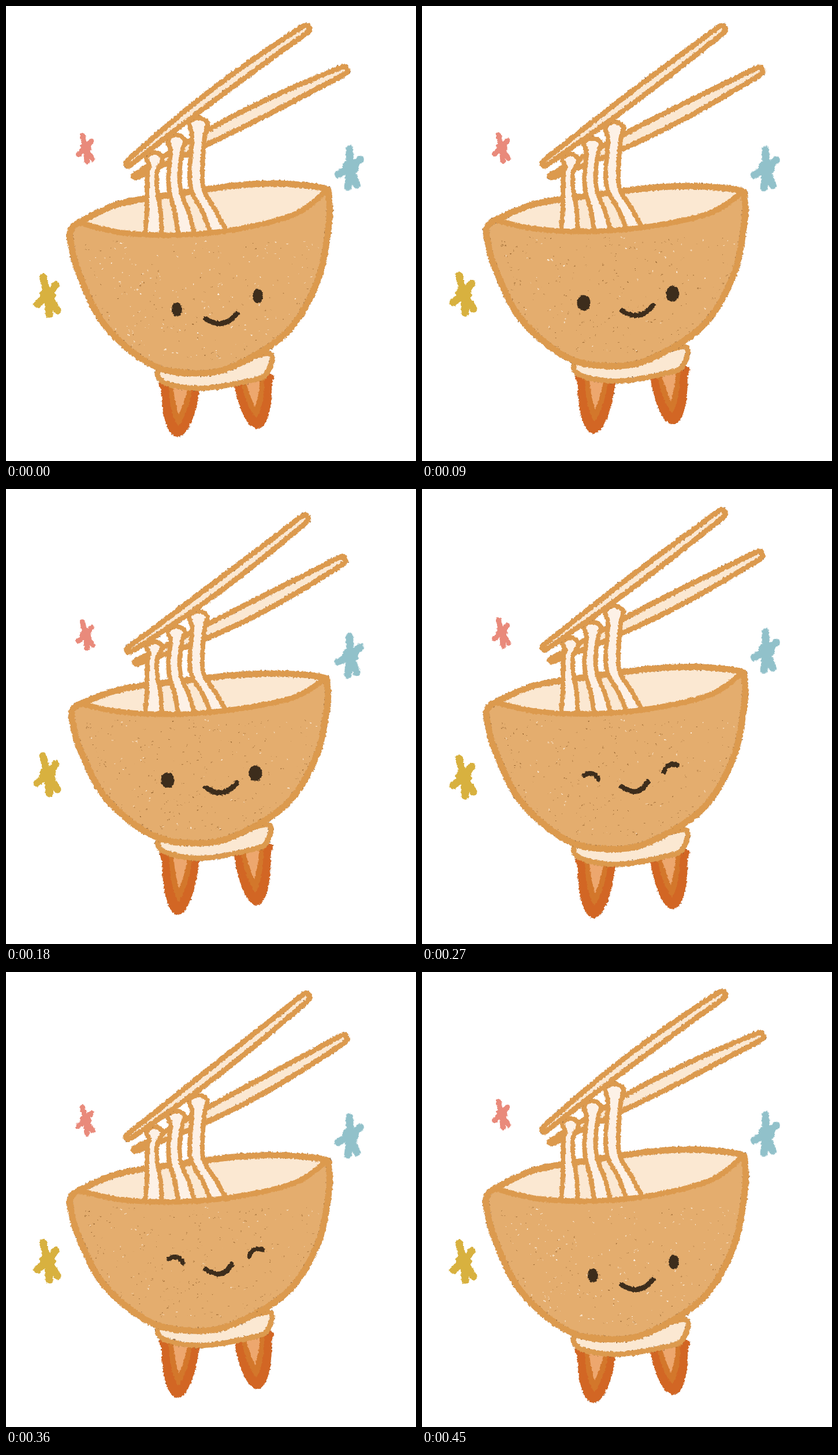
Recreate the animation shown at these times as an HTML page. Size 710x789 px, loop 0.54 s.

```html
<!DOCTYPE html>
<html lang="en">
<head>
<meta charset="utf-8">
<title>Happy noodle bowl</title>
<style>
html, body { margin: 0; width: 100%; height: 100%; overflow: hidden; background: #fff; }
#stage { position: relative; width: 710px; height: 789px; overflow: hidden; }
#strip { display: flex; width: 4260px; height: 789px; animation: play 540ms steps(6) infinite; }
#strip svg { flex: none; width: 710px; height: 789px; display: block; }
#defs { position: absolute; width: 0; height: 0; }
path { stroke-linecap: round; stroke-linejoin: round; }
.flat { stroke-linecap: butt; }
@keyframes play { to { transform: translateX(-4260px); } }
</style>
</head>
<body>
<svg id="defs">
  <filter id="rough" filterUnits="userSpaceOnUse" x="0" y="0" width="710" height="789" color-interpolation-filters="sRGB">
    <feTurbulence type="fractalNoise" baseFrequency=".25" numOctaves="2" seed="4"/>
    <feDisplacementMap in="SourceGraphic" scale="4.5" xChannelSelector="R" yChannelSelector="G"/>
  </filter>
</svg>
<div id="stage"><div id="strip"></div></div>
<script>
const LINE = '#dc9a4e', TAN = '#e4ad6e', CREAM = '#fbe8d2', NOODLE = '#fdf1e6', INK = '#3d2d1c', GRIT = '#7a5230';
const CARROT = ['#d26624', '#d3772b', '#eda76e'];

const pts = s => s.split(' ').map(p => p.split(',').map(Number));
const lerp = (a, b, t) => a + (b - a) * t;
const clamp = t => Math.min(1, Math.max(0, t));
const range = n => Array.from({ length: n }, (_, i) => i);

// key points of the bowl
const BACK = pts('140,368 200,342 300,325 400,311 475,308 550,316');
const SIDE = pts('559,332 559,380 540,475 488,564 400,622 330,637 250,621 170,552 126,463 113,415 113,387');
const FRONT = pts('128,376 200,393 300,397 400,387 500,361 555,320');
const FOOT = pts('267,630 274,653 340,663 430,648 453,635 457,603 400,615 330,625');

const LEGS = [{ base: [303, 650], tip: [297, 747] }, { base: [426, 638], tip: [435, 733] }];
const UPPER = { from: [213, 272], to: [519, 40], ends: [4.5, 6.5], belly: 3.5, arch: -7 };
const LOWER = { from: [226, 294], to: [584, 112], ends: [3, 6.5], belly: 7.5, arch: -4 };

const RAYS = pts('-8,-32 14,-18 -18,15 3,33 17,26');
const STARS = [
  { color: '#e98a7b', x: 138, y: 247, size: .7, turn: 0 },
  { color: '#91c1ca', x: 596, y: 281, size: 1, turn: 12 },
  { color: '#d8b13f', x: 72, y: 502, size: 1, turn: 0 }
];

// body: shift of back rim, front rim, foot and toes; stick: shift at left, right and sag
const KNOTS = [304, 390, 655, 747];
const POSES = [
  { body: [0, 0, 0, 0], sx: 1, stick: [0, 0, 0], stars: [0, 0, 0], left: [296, 526], right: [436, 503], eye: 9, smile: 542 },
  { body: [5, -6, -13, -6], sx: .997, stick: [0, 1, 8], stars: [-1, 1, -3], left: [280, 515], right: [434, 499], eye: 11.5, smile: 528 },
  { body: [13, -6, -24, -9], sx: .987, stick: [6, 12, 12], stars: [6, 8, -7], left: [280, 505], right: [432, 493], eye: 11.5, smile: 518 },
  { body: [1, -7, -13, -3], sx: .996, stick: [2, 3, 8], stars: [2, 0, -3], left: [294, 497], right: [429, 482], smile: 516 },
  { body: [10, 2, -16, -9], sx: 1, stick: [13, 4, 11], stars: [10, 3, -1], left: [295, 498], right: [431, 485], smile: 515 }
];

// smooth curve through the points
function curve(p, closed) {
  const n = p.length, at = i => closed ? p[(i + n) % n] : p[Math.max(0, Math.min(n - 1, i))];
  const f = (x, y) => x.toFixed(1) + ' ' + y.toFixed(1);
  let d = 'M' + f(...p[0]);
  for (let i = 0; i < (closed ? n : n - 1); i++) {
    const [a, b, c, e] = [at(i - 1), at(i), at(i + 1), at(i + 2)];
    d += 'C' + f(b[0] + (c[0] - a[0]) / 6, b[1] + (c[1] - a[1]) / 6) + ' ' +
      f(c[0] - (e[0] - b[0]) / 6, c[1] - (e[1] - b[1]) / 6) + ' ' + f(...c);
  }
  return d + (closed ? 'Z' : '');
}

const shape = (d, fill) => `<path d="${d}" fill="${fill}"/>`;
const line = (d, color, w, extra = '') => `<path d="${d}" fill="none" stroke="${color}" stroke-width="${w}" ${extra}/>`;
const grit = (d, w) => line(d, GRIT, w, 'class="flat" stroke-dasharray="1 6 2 9 1 5 1 13"');
const outlined = (d, fill, w = 9) => shape(d, fill) + grit(d, w + 1.2) + line(d, LINE, w);

function random(seed) {
  return () => (seed = seed * 16807 % 2147483647) / 2147483647;
}

function specks(count, seed, warp) {
  const rnd = random(seed);
  return range(count).map(() => {
    const y = 408 + 205 * rnd() ** 1.3;
    const half = 205 * Math.sqrt(1 - ((y - 400) / 235) ** 2);
    const [px, py] = warp([338 + half * (rnd() * 2 - 1), y]);
    return `M${px.toFixed(1)} ${py.toFixed(1)}h${(rnd() * 1.2).toFixed(1)}`;
  }).join('');
}

// a leg is three nested petals, each shorter, slimmer and more pointed
function leg({ base, tip }, warp) {
  return CARROT.map((color, k) => {
    const half = 33 * .62 ** k, len = 1 - .2 * k;
    const edge = side => range(9).map(i => {
      const t = Math.sin(i / 8 * Math.PI / 2);
      const w = half * (1 - t * t) ** (.5 + .3 * k);
      return warp([lerp(base[0], tip[0], t * len) + side * w, lerp(base[1], tip[1], t * len)]);
    });
    const d = curve([...edge(-1), ...edge(1).reverse().slice(1)], true);
    return (k ? '' : grit(d, 1.6)) + shape(d, color);
  }).join('');
}

const bend = ([l, r, sag], t) => lerp(l, r, t) + 4 * sag * t * (1 - t);

// tapered stick with a thicker middle
function stick(s, pose) {
  const dx = s.to[0] - s.from[0], dy = s.to[1] - s.from[1], len = Math.hypot(dx, dy);
  const ux = dx / len, uy = dy / len;
  const point = (t, along, side) => {
    const w = lerp(...s.ends, t) + s.belly * Math.sin(Math.PI * t);
    const x = s.from[0] + dx * t + (along * ux + side * uy) * w;
    const y = s.from[1] + dy * t + (along * uy - side * ux) * w;
    return [335 + (x - 335) * pose.sx, y + 4 * s.arch * t * (1 - t) + bend(pose.stick, t)];
  };
  const edge = side => range(9).map(i => point(i / 8, 0, side));
  return outlined(curve([point(0, -1, 0), ...edge(1), point(1, 1, 0), ...edge(-1).reverse()], true), CREAM);
}

// strand i hangs from the lower stick and leans right as it enters the bowl
function noodle(i, pose) {
  const x = 257 + 38 * i, top = 255 - 30 * i, lean = 19 * i - 2;
  const lift = bend(pose.stick, .3), fall = pose.body[1];
  const hang = ([px, y]) => [px, y + lerp(lift, fall, clamp((y - 200) / 190))];
  const edge = side => [
    [x + side * (14 + i), top + 9],
    [x + side * (9 + i), top + 22 + 5 * i],
    [x - 4 + side * (8 + 1.5 * i), 290],
    [x - 4 + 2 * i + side * (9 + i), 322],
    [x + lean * .55 + side * 12, 358],
    [x + lean + side * 14.2, 394]
  ];
  const cap = [[x - 6, top], [x + 6, top]];
  const d = curve([...edge(-1).reverse(), ...cap, ...edge(1)].map(hang));
  return shape(d, NOODLE) + line(d, LINE, 8, 'class="flat"');
}

function star(s, dy) {
  const rays = RAYS.map(p => `M0 0L${p}`).join('');
  return `<g transform="translate(${s.x} ${s.y + dy}) rotate(${s.turn}) scale(${s.size})">` +
    line(rays, s.color, 13) + `<circle r="14" fill="${s.color}"/></g>`;
}

function face({ left, right, eye, smile }) {
  const eyes = [[left, 16], [right, -28]].map(([[x, y], tilt]) => eye
    ? `<ellipse cx="${x}" cy="${y}" rx="${eye}" ry="${eye * .5 + 8}" fill="${INK}"/>`
    : line('M-13 3Q0 -10 13 3', INK, 8, `transform="translate(${x} ${y}) rotate(${tilt})"`));
  const end = eye ? 400 : 391;
  return eyes.join('') + line(`M346 ${smile}Q376 ${smile + 21} ${end} ${smile - 9}`, INK, 8.5);
}

function draw(pose, index) {
  const body = ([x, y]) => {
    const i = KNOTS.findLastIndex((k, j) => j < 3 && (y >= k || j === 0));
    const t = clamp((y - KNOTS[i]) / (KNOTS[i + 1] - KNOTS[i]));
    return [335 + (x - 335) * pose.sx, y + lerp(pose.body[i], pose.body[i + 1], t)];
  };
  const bowl = curve([...BACK, ...SIDE].map(body), true);
  const rim = curve(FRONT.map(body));
  const inside = curve(BACK.map(body)) + curve(FRONT.map(body).reverse()).replace('M', 'L') + 'Z';

  const art = [
    ...LEGS.map(l => leg(l, body)),
    outlined(curve(FOOT.map(body), true), CREAM),
    shape(bowl, TAN), shape(inside, CREAM), grit(bowl, 12.2), line(bowl, LINE, 11),
    stick(LOWER, pose),
    ...range(3).map(i => noodle(i, pose)),
    stick(UPPER, pose),
    line(rim, LINE, 9.5),
    line(specks(index ? 260 : 120, 77, body), '#94632f', 1),
    line(specks(index ? 50 : 170, 901, body), '#fff3e4', 1.3),
    face(pose),
    ...STARS.map((s, i) => star(s, pose.stars[i]))
  ].join('');
  return `<svg viewBox="0 0 710 789"><g filter="url(#rough)">${art}</g></svg>`;
}

// the loop rests on its first pose
const cells = POSES.map(draw);
document.getElementById('strip').innerHTML = [...cells, cells[0]].join('');
</script>
</body>
</html>
```
